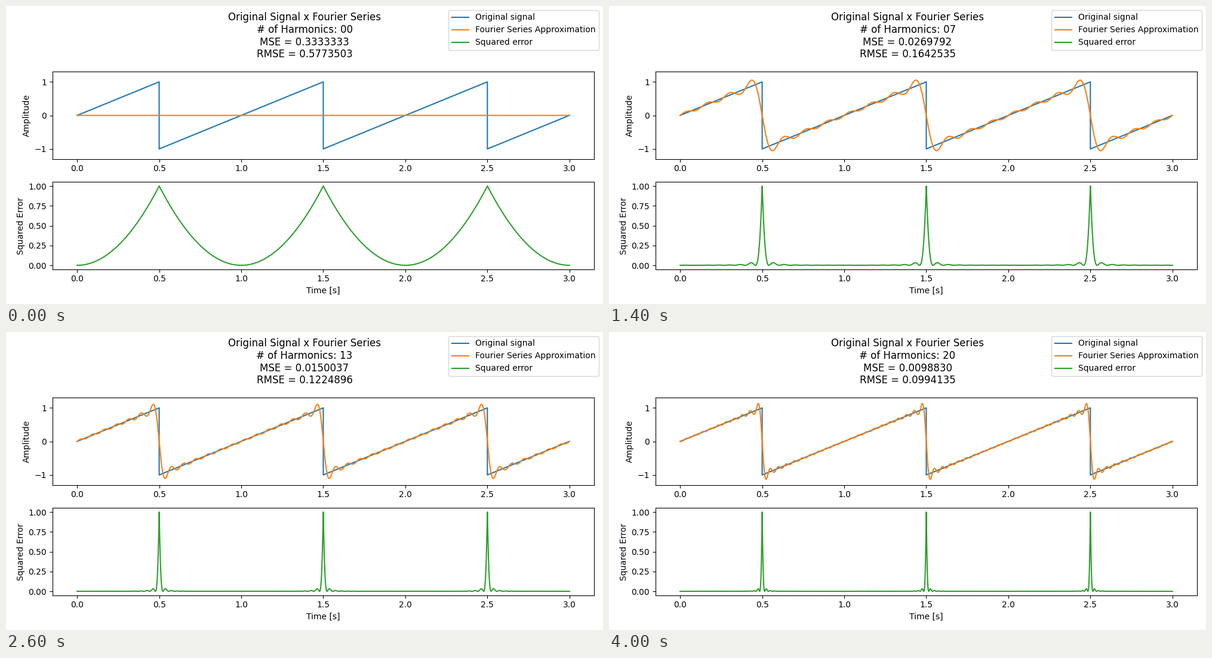
A matplotlib script for the animation above (4200 ms loop, 1000 by 500 pixels).

```python
import numpy as np
import matplotlib.pyplot as plt
from matplotlib.animation import FuncAnimation

MAX_HARMONICS = 20
INTERVAL = 200

t = np.arange(30001) / 10000
signal = 2 * (t - np.floor(t + 0.5))


def partial_sum(count):
    """Sawtooth Fourier series truncated after `count` harmonics."""
    total = np.zeros_like(t)
    for n in range(1, count + 1):
        total += (-1) ** (n + 1) * 2 / (np.pi * n) * np.sin(2 * np.pi * n * t)
    return total


def mean_squared_error(count):
    """Residual power by Parseval's theorem."""
    return 1 / 3 - sum(2 / (np.pi * n) ** 2 for n in range(1, count + 1))


def heading(count):
    mse = mean_squared_error(count)
    return (
        "Original Signal x Fourier Series\n"
        f"# of Harmonics: {count:02d}\n"
        f"MSE = {mse:.7f}\n"
        f"RMSE = {np.sqrt(mse):.7f}"
    )


fig, (ax_sig, ax_err) = plt.subplots(2, 1, figsize=(10, 5), dpi=100)

ax_sig.plot(t, signal, color="C0", label="Original signal")
approx_line, = ax_sig.plot(t, partial_sum(0), color="C1",
                           label="Fourier Series Approximation")
ax_sig.set_ylim(-1.3, 1.3)
ax_sig.set_ylabel("Amplitude")

error_line, = ax_err.plot(t, signal ** 2, color="C2", label="Squared error")
ax_err.set_ylabel("Squared Error")
ax_err.set_xlabel("Time [s]")

title = fig.suptitle(heading(0))
fig.legend()
fig.tight_layout()


def update(count):
    approx = partial_sum(count)
    approx_line.set_ydata(approx)
    error_line.set_ydata((signal - approx) ** 2)
    title.set_text(heading(count))
    return approx_line, error_line, title


anim = FuncAnimation(fig, update, frames=MAX_HARMONICS + 1,
                     interval=INTERVAL, repeat=True, repeat_delay=0)
plt.show()
```
